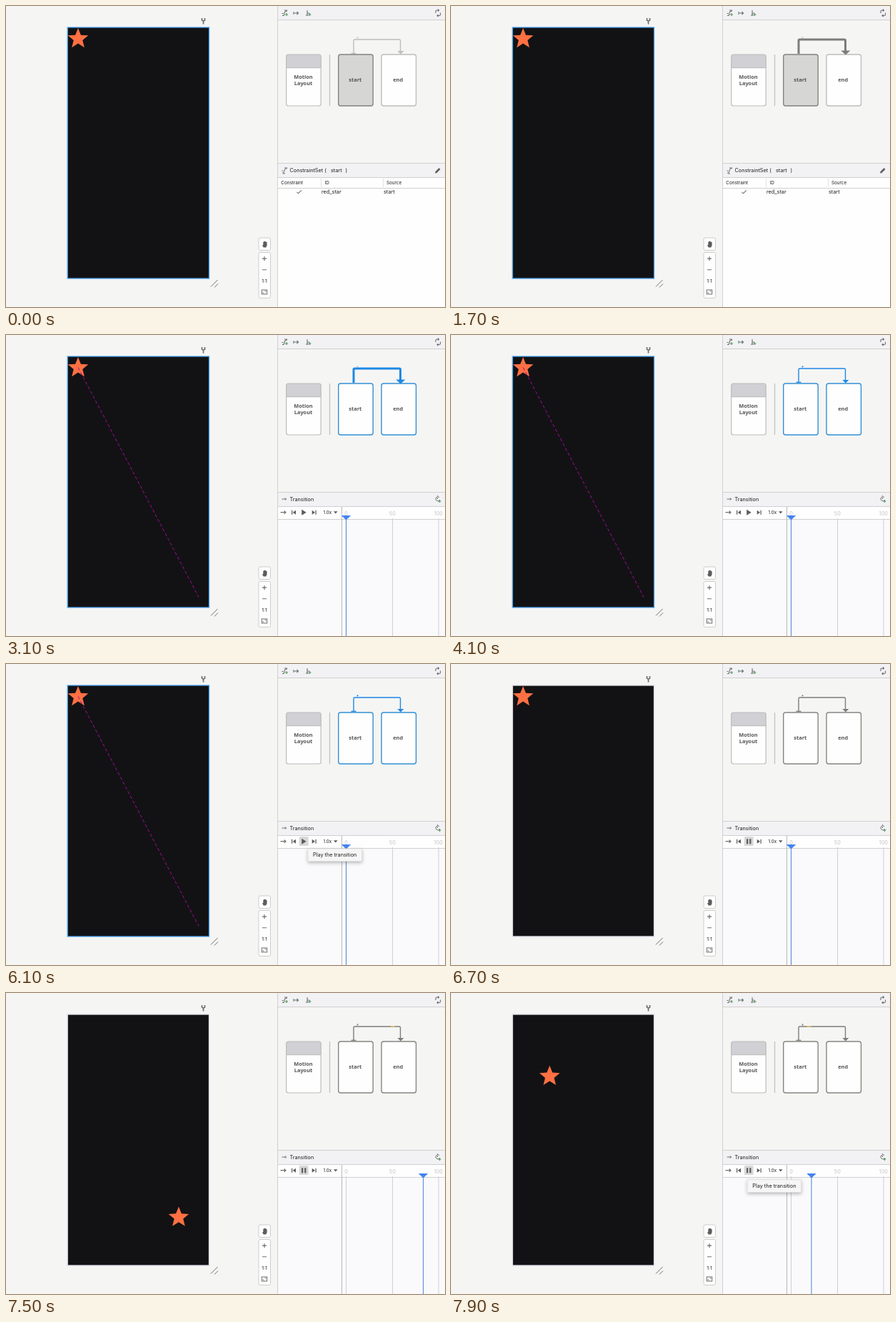
Animation of 615 by 422 pixels, one loop 8000 ms. Source, as an HTML page:

```html
<!DOCTYPE html>
<html lang="en">
<head>
<meta charset="utf-8">
<title>Motion editor</title>
<style>
html, body { margin: 0; width: 100%; height: 100%; overflow: hidden; background: #f5f5f4; }
svg { display: block; }
text { font: 7.25px Inter, Roboto, sans-serif; fill: #1c1c1c; }
.small { font-size: 6.3px; }
.mid { text-anchor: middle; }
.card text, text.card { font: 700 7.4px "Open Sans", "Noto Sans", sans-serif; fill: #555; text-anchor: middle; }
.line { fill: none; stroke: #6e6e6e; }
.rule { fill: none; stroke: #d0d0d0; }
.green { fill: none; stroke: #4f9a5c; }
.tick { fill: #c2c2c4; text-anchor: middle; }
</style>
</head>
<body>
<svg width="615" height="422" viewBox="0 0 615 422">
  <defs>
    <filter id="shadow" x="-20%" y="-40%" width="140%" height="200%">
      <feDropShadow dx="0" dy="2" stdDeviation="2.5" flood-opacity=".28"/>
    </filter>
  </defs>
  <rect width="615" height="422" fill="#f5f5f4"/>

  <!-- Preview -->
  <rect id="screen" x="86.2" y="30" width="198.3" height="352" fill="#121214" stroke-width="1.3"/>
  <path id="star" fill="#ff7043"/>
  <path id="route" d="M101 45.5L270 367.5" fill="none" stroke="#a5089f" stroke-dasharray="4.5 3"/>
  <path class="line" d="M274.5 17v3.2q2 1.6 4 0V17M276.5 21v4.5" stroke="#444" stroke-width="1.7"/>
  <path class="line" d="M287 393.500l9.500-9.500M292 394.500l5-5" stroke="#909090"/>
  <g fill="#fefefe" stroke="#cdcdcd">
    <rect x="354" y="325" width="16.500" height="17.500" rx="2"/>
    <rect x="354" y="345.500" width="16.500" height="64" rx="2"/>
  </g>
  <path d="M359 335.500l1.300-.5v-4l1-.4.6-1 1 .6 1.200-.2.500 1 1 .5v4l-1.300 3h-3.600z" fill="#5c5c5c"/>
  <path class="line" d="M359 354.200h6M362 351.200v6" stroke-width="1.200"/>
  <path class="line" d="M359 369.800h6" stroke="#b5b5b5"/>
  <text class="mid" x="362" y="387.700" font-weight="600" style="font-size:6.800px">1:1</text>
  <rect class="line" x="358.300" y="398" width="7.400" height="6" stroke="#bababa"/>
  <path class="line" d="M360 402.500v-1.500M360 402.500h1.500M364 399.500v1.500M364 399.500h-1.500" stroke="#bababa" stroke-width=".7"/>

  <!-- Graph -->
  <rect x="380" width="235" height="20" fill="#f2f2f5"/>
  <rect x="380" y="221" width="235" height="19" fill="#f2f2f5"/>
  <path class="rule" d="M380.500 0V422M380 19.500H615M380 220.500H615M380 240.500H615"/>
  <g stroke-width="1.100">
    <path class="line" d="M387 13.500q3 .5 3-3t4-3.500M386.500 10.500h2M390 6h4"/>
    <path class="green" d="M391 12h4M393 10v4"/>
    <path class="line" d="M403 10h6M407.500 8l2 2-2 2"/>
    <path class="green" d="M403 8v4"/>
    <path class="line" d="M422 6v7M422 10h3M420 13h4"/>
    <path class="green" d="M423.500 12h4M425.500 10v4"/>
    <path class="line" d="M602 10v-2.500q0-1.500 1.500-1.500h3M605 4.500l1.500 1.500-1.500 1.500M608.500 9.500v2.500q0 1.500-1.500 1.500h-3M605.500 12l-1.500 1.500 1.500 1.500"/>
  </g>
  <g class="card">
    <rect x="392.700" y="68" width="48.500" height="72" rx="3" fill="#fefefe"/>
    <path d="M392.700 86.500V71q0-3 3-3h42.500q3 0 3 3v15.500z" fill="#d1d1d5"/>
    <rect x="392.700" y="68" width="48.500" height="72" rx="3" fill="none" stroke="#bcbcbc" stroke-width="1.200"/>
    <path d="M393 86.500h48M453.500 68V140" stroke="#c2c2c2" stroke-width="1.300"/>
    <rect id="start" x="465.700" y="68" width="48.500" height="72" rx="3" stroke-width="1.400"/>
    <rect id="end" x="526" y="68" width="48.500" height="72" rx="3" fill="#fefefe" stroke-width="1.400"/>
    <text x="416.500" y="102.200">Motion</text>
    <text x="416.500" y="111">Layout</text>
    <text x="489.300" y="106">start</text>
    <text x="549.200" y="106">end</text>
  </g>
  <path id="wire" d="M487 67V48.500q0-1.500 1.500-1.500h62.500q1.500 0 1.500 1.500V64" fill="none"/>
  <path id="foot" d="M483.500 66.300h7"/>
  <path id="head"/>
  <circle id="dot" cx="492.500" cy="44.300" r="1.100"/>
  <path id="spark" d="M-3 46.800h6" stroke="#e8c65c" stroke-width="1.500"/>

  <!-- Constraint table -->
  <g id="table">
    <rect x="381" y="241" width="234" height="181" fill="#fefefe"/>
    <path class="rule" d="M381 255.500H615" stroke="#e4e4e4"/>
    <path class="rule" d="M441.500 242V254M528.500 242V254" stroke-dasharray="1.500 1"/>
    <path class="line" d="M387 234q3 .5 3-3t4-3.500M386.500 231h2M390 227h4M388 235h3" stroke="#8b8b8b"/>
    <text x="397.500" y="233">ConstraintSet (</text>
    <text x="455" y="233">start</text>
    <text x="475.500" y="233">)</text>
    <path d="M601 234.500l.6-2.400 5-5 1.900 1.900-5 5z" fill="#5f5f5f"/>
    <text class="small" x="385.300" y="249.700">Constraint</text>
    <text class="small" x="446.500" y="249.700">ID</text>
    <text class="small" x="533" y="249.700">Source</text>
    <path class="line" d="M407.500 260.800l2 2 4.300-4.500" stroke="#333" stroke-width="1.100"/>
    <text x="442" y="263">red_star</text>
    <text x="529" y="263">start</text>
  </g>

  <!-- Transition timeline -->
  <g id="timeline">
    <rect x="381" y="241" width="234" height="181" fill="#fafafc"/>
    <rect x="381" y="241" width="234" height="17" fill="#fefefe"/>
    <path class="line" d="M386.500 230h6M391 228.300l1.700 1.700-1.700 1.700" stroke="#8c8c8c"/>
    <text x="397.500" y="233">Transition</text>
    <path class="line" d="M607 227.500a3 3 0 1 0 .5 4M604.500 226v-1M604.500 230v-2"/>
    <path class="green" d="M605.500 233h4M607.500 231v4" stroke-width="1.200"/>
    <path class="rule" d="M381 258.500H615"/>
    <path class="rule" d="M476.500 257V422M541.500 257V422M606 257V422" stroke="#dedee0"/>
    <path d="M470.500 241V422" stroke="#b9b9bb"/>
    <rect id="hover" y="242" width="13" height="13" rx="1.500" fill="#d8d8d8"/>
    <path class="line" d="M384.500 248.700h7M389.700 246.500l2.200 2.200-2.200 2.200" stroke="#555" stroke-width="1.200"/>
    <path d="M400 245.700h1.200v6h-1.200zM406 245.700v6l-4.300-3zM433.500 245.700h1.200v6h-1.200zM428.700 245.700v6l4.300-3z" fill="#5c5c5c"/>
    <path id="play" fill="#5c5c5c"/>
    <text x="444.500" y="251" font-weight="500" class="small">1.0x</text>
    <path d="M459 247.300h5.500l-2.750 3.200z" fill="#5c5c5c"/>
    <text class="tick" x="476.500" y="252.700">0</text>
    <text class="tick" x="541.300" y="252.700">50</text>
    <text class="tick" x="605.800" y="252.700">100</text>
    <g id="cursor">
      <path d="M0 258V422" stroke="#5a8bd8" stroke-width="1.100"/>
      <path d="M-6.700 253H6.700L0 259.500z" fill="#4383f2"/>
    </g>
  </g>
  <g id="tip">
    <rect width="75.500" height="17.500" fill="#f6f6f6" stroke="#d6d6d6" stroke-width=".6" filter="url(#shadow)"/>
    <text class="mid" x="37.700" y="11.300">Play the transition</text>
  </g>
</svg>
<script>
const el = id => document.getElementById(id);
const set = (id, attrs) => {
  for (const k in attrs) el(id).setAttribute(k, attrs[k]);
};
const show = (id, on) => set(id, { opacity: Number(on) });
const move = (id, x, y = 0) => set(id, { transform: `translate(${x} ${y})` });

const points = Array.from({ length: 10 }, (_, i) => {
  const r = i % 2 ? 6.6 : 15, a = i * Math.PI / 5;
  return [r * Math.sin(a), -r * Math.cos(a)].map(v => v.toFixed(2));
});
set("star", { d: "M" + points.join("L") + "z" });

const BLUE = "#1e88e5", GREY = "#7d7d7a";

function progress(t) {
  if (t >= 7700) return .04 + (t - 7700) * .0009;
  return Math.max(0, .37 + (t - 7100) * .00116);
}

function draw(t) {
  const picked = t >= 2700, playing = t >= 6500;
  const wide = t >= 1700 && t < 3900;
  const p = progress(t);

  // Cards and arrow
  const tint = playing ? GREY : picked ? BLUE : wide ? GREY : "#bdbdbd";
  const border = playing ? "#858582" : "#3390d4";
  const over = t >= 2600 && !picked;
  set("start", {
    fill: picked ? "#fefefe" : over ? "#d2e7fc" : "#d6d6d4",
    stroke: picked || over ? border : "#83837f"
  });
  set("end", { stroke: picked ? border : "#bdbdbd" });
  set("wire", { stroke: tint, "stroke-width": wide ? 3 : 1.4 });
  set("foot", { stroke: tint, "stroke-width": 1.3 });
  set("head", {
    d: wide ? "M546.300 62.500h13l-6.500 6z" : "M548.300 63h9l-4.500 4.500z",
    fill: tint
  });
  set("dot", { fill: tint });
  show("foot", !wide);
  show("dot", wide ? .4 : 1);
  show("spark", playing && p > 0);
  move("spark", 487 + 66 * p);

  // Preview
  set("screen", { stroke: playing ? "#e2dce6" : "#4ba0ee" });
  move("star", 101 + 169 * p, 46 + 322 * p);
  show("route", picked && !playing);

  // Lower panel
  show("table", !picked);
  show("timeline", picked);
  move("cursor", 476.5 + 129.5 * p);
  show("hover", t >= 5500);
  set("hover", { x: t < 5700 ? 425 : 410.7 });
  set("play", {
    d: playing ? "M414 245.200h2.200v7h-2.200zM418.200 245.200h2.200v7h-2.200z"
               : "M414.200 244.700v8l6.500-4z"
  });

  // Tooltip
  const again = t >= 7800;
  move("tip", again ? 415.2 : 423, again ? 261.8 : 259);
  show("tip", again || t >= 6100 && !playing ? 1 : t === 6000 ? .5 : 0);
}

const begin = performance.now();
function tick() {
  const t = (performance.now() - begin) % 8000;
  draw(Math.floor(t / 100) * 100);
  requestAnimationFrame(tick);
}
tick();
</script>
</body>
</html>
```
